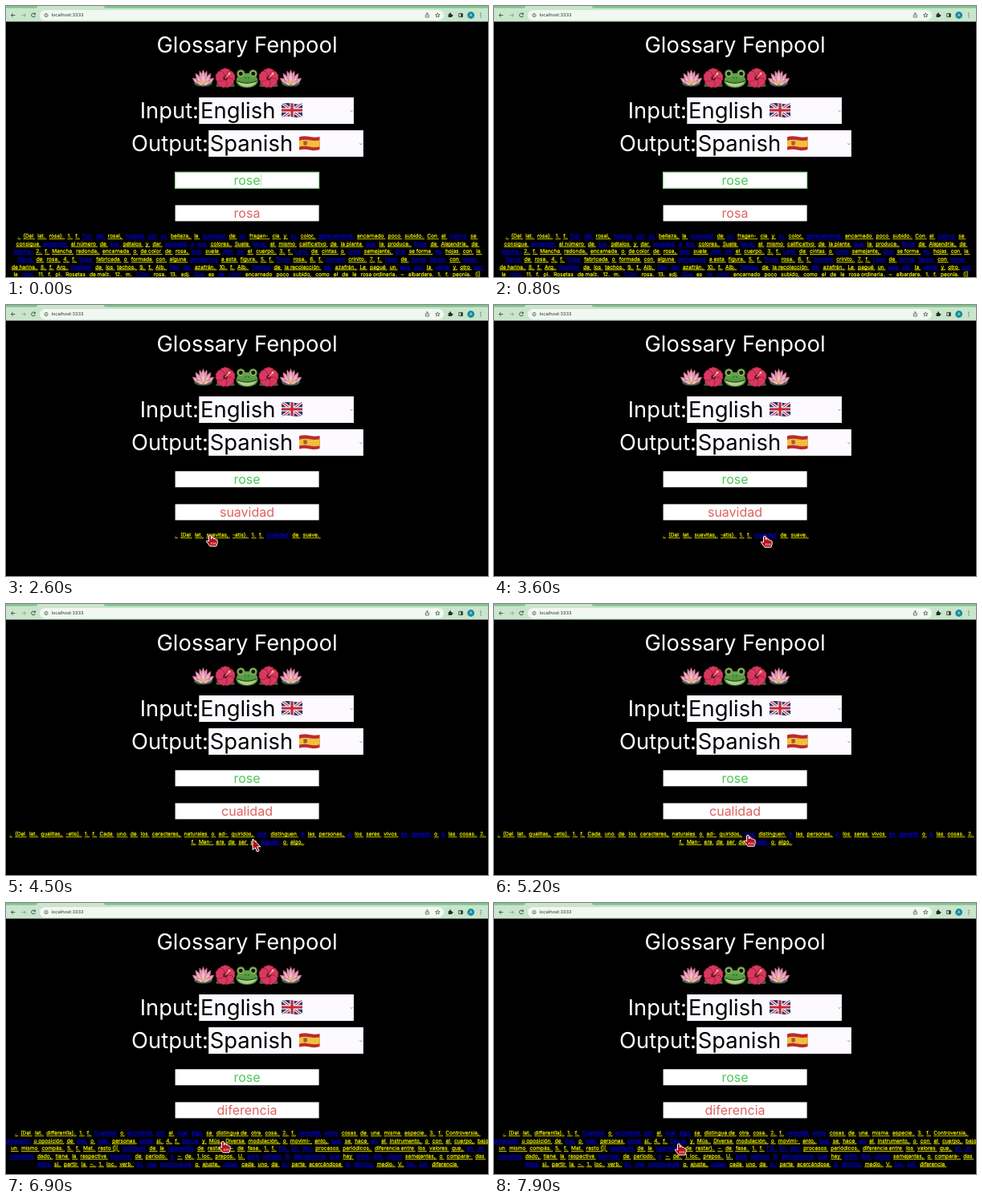
An HTML page for the animation above (8000 ms loop, 600 px wide and 338 px high).

```html
<!DOCTYPE html>
<html lang="en">
<head>
<meta charset="utf-8">
<title>Glossary Fenpool</title>
<style>
html, body { margin: 0; width: 100%; height: 100%; overflow: hidden; background: #000; }
svg { display: block; width: 100vw; height: 100vh; font-family: Inter, sans-serif; text-rendering: geometricPrecision; }
.big { font-size: 27.4px; }
.field { font-size: 16px; text-anchor: middle; }
.def { font-size: 6.6px; text-anchor: middle; }
.def tspan { fill: #ff0; stroke: #ff0; stroke-width: .18px; text-decoration: underline; }
.def .known { fill: #00d; stroke: #00d; }
.icon { fill: none; stroke: #3b463e; stroke-width: .9; }
</style>
</head>
<body>
<svg viewBox="0 0 600 338">
  <defs>
    <linearGradient id="petal" x1="0" y1="0" x2="0" y2="1">
      <stop offset="0" stop-color="#e283a4"/><stop offset="1" stop-color="#fae3e4"/>
    </linearGradient>
    <linearGradient id="skin" x1="0" y1="0" x2="0" y2="1">
      <stop offset="0" stop-color="#62a94b"/><stop offset="1" stop-color="#47873a"/>
    </linearGradient>
    <g id="lotus">
      <path d="M-12 6Q-7 3 0 5Q7 3 12 6Q9 11 0 10.5Q-9 11-12 6Z" fill="#39683c"/>
      <g fill="url(#petal)" stroke="#bd6482" stroke-width=".6">
        <path d="M0 8Q-11 8-13.3 0Q-6-.5 0 8Z"/><path d="M0 8Q11 8 13.3 0Q6-.5 0 8Z"/>
        <path d="M0 8Q-10 3-9.5-6Q-3-3 0 8Z"/><path d="M0 8Q10 3 9.5-6Q3-3 0 8Z"/>
        <path d="M0 8Q-6 0-4.5-9Q0-5 0 8Z"/><path d="M0 8Q6 0 4.5-9Q0-5 0 8Z"/>
        <path d="M0 8Q-5 0 0-10.5Q5 0 0 8Z"/>
        <path d="M0 9Q-7 9-8.5 3Q-3 3 0 9Z"/><path d="M0 9Q7 9 8.5 3Q3 3 0 9Z"/>
      </g>
      <path d="M-3 4.5Q0 1 3 4.5L0 8Z" fill="#e6bd5c"/>
    </g>
    <g id="hibiscus">
      <path d="M-12 10Q-10 4-3 4L0 6L3 4Q10 4 12 10Q6 12.5 0 8Q-6 12.5-12 10Z" fill="#3c6f38"/>
      <g id="petals"></g>
      <circle r="2.8" fill="#7d0e2c"/>
      <path d="M0 0L4.5-5" stroke="#f0b9a0" stroke-width="1.1"/>
      <circle cx="5" cy="-5.6" r="1.3" fill="#f3cd62"/>
    </g>
    <g id="frog">
      <g fill="#569c43"><circle cx="-7.6" cy="-6" r="5.2"/><circle cx="7.6" cy="-6" r="5.2"/></g>
      <path d="M-13.6 4Q-13-6 0-6.5Q13-6 13.6 4Q11 11.5 0 11.5Q-11 11.5-13.6 4Z" fill="url(#skin)"/>
      <path d="M-12.4 3.6Q0 9 12.4 3.6Q9 10.5 0 10.5Q-9 10.5-12.4 3.6Z" fill="#b4cf88"/>
      <g fill="#d9cf86"><circle cx="-7.8" cy="-6.2" r="3.4"/><circle cx="7.8" cy="-6.2" r="3.4"/></g>
      <g fill="#11180d"><circle cx="-7.8" cy="-6.2" r="2.6"/><circle cx="7.8" cy="-6.2" r="2.6"/>
        <circle cx="-1.8" cy="-.8" r=".6"/><circle cx="1.8" cy="-.8" r=".6"/></g>
      <path d="M-12.4 3Q0 8.4 12.4 3" fill="none" stroke="#24491c" stroke-width="1.1"/>
    </g>
    <clipPath id="flagBox"><path d="M0 1.5Q6-.8 13 .8T26 .8V17Q20 19 13 17.4T0 17.6Z"/></clipPath>
  </defs>

  <rect width="600" height="338"/>

  <g id="browser">
    <rect width="600" height="19.5" fill="#c9e5cc"/>
    <rect width="600" height="2.6" fill="#7cc58d"/>
    <path d="M36 3Q39 3 39 0H122Q122 3 125 3Z" fill="#c9e5cc"/>
    <rect x="42" y="5" width="503" height="13" rx="6.5" fill="#f0f8f1"/>
    <g class="icon">
      <path d="M11.3 11.5H6.5M8.7 9.2L6.3 11.5L8.7 13.8"/>
      <path d="M19.6 11.5H24.4M22.3 9.2L24.7 11.5L22.3 13.8" stroke="#8fa594"/>
      <path d="M36 9.9A2.4 2.4 0 1 0 36.4 12M36.4 8.6V10.4H34.5"/>
      <circle cx="50" cy="11.5" r="2.1" stroke-width=".7"/><path d="M50 11.2V12.7M50 10V10.5" stroke-width=".7"/>
      <path d="M523.3 10.8H522.3V14H526.3V10.8H525.3M524.3 12.2V8.4M523.1 9.5L524.3 8.3L525.5 9.5" stroke-width=".7"/>
      <path d="M537.3 8.7L538.1 10.6L540.1 10.7L538.5 11.9L539 13.9L537.3 12.8L535.6 13.9L536.1 11.9L534.5 10.7L536.5 10.6Z" stroke-width=".7"/>
      <path d="M563.7 9.4H568.3V13.6H563.7Z"/>
    </g>
    <g fill="#26302a">
      <path d="M550.6 9.9H552.2A1 1 0 1 1 553.8 9.9H555V11A1 1 0 1 1 555 12.7V14H550.6Z"/>
      <path d="M566.2 9.4H568.3V13.6H566.2Z"/>
      <circle cx="591" cy="9.2" r=".6"/><circle cx="591" cy="11.5" r=".6"/><circle cx="591" cy="13.8" r=".6"/>
    </g>
    <circle cx="578.7" cy="11.5" r="4.4" fill="#168aa0"/>
    <text x="578.7" y="13.3" font-size="5" text-anchor="middle" fill="#fff">A</text>
    <text x="56.5" y="13.4" font-size="5.7" fill="#26302a">localhost:3333</text>
  </g>

  <text class="big" x="300" y="58" text-anchor="middle" fill="#fff">Glossary Fenpool</text>
  <use href="#lotus" x="245.5" y="90"/><use href="#hibiscus" x="273" y="90"/>
  <use href="#frog" x="300" y="90.5"/>
  <use href="#hibiscus" x="327" y="90"/><use href="#lotus" x="354.5" y="90"/>

  <g fill="#fdfaff"><rect x="240.3" y="114" width="192.6" height="33"/><rect x="252.2" y="155" width="192.6" height="33"/></g>
  <g class="big">
    <text x="240" y="140" text-anchor="end" fill="#fff">Input:</text>
    <text x="252" y="181.2" text-anchor="end" fill="#fff">Output:</text>
    <text x="242" y="140">English</text>
    <text x="253.7" y="181.2">Spanish</text>
  </g>
  <g fill="none" stroke="#555" stroke-width=".7">
    <path d="M428.8 130.2L430.2 131.6L431.6 130.2"/><path d="M440.3 171.4L441.7 172.8L443.1 171.4"/>
  </g>
  <g transform="translate(343 120.8)"><g clip-path="url(#flagBox)">
    <rect width="26" height="19" fill="#263672"/>
    <path d="M0 0L26 19M26 0L0 19" stroke="#f4f2f4" stroke-width="3.6"/>
    <path d="M0 0L26 19M26 0L0 19" stroke="#c32a3c" stroke-width="1.2"/>
    <path d="M13 0V19M0 9.2H26" stroke="#f4f2f4" stroke-width="5.4"/>
    <path d="M13 0V19M0 9.2H26" stroke="#c32a3c" stroke-width="3.2"/>
  </g></g>
  <g transform="translate(364.8 162.1)"><g clip-path="url(#flagBox)">
    <rect width="26" height="19" fill="#bb2c2e"/>
    <path d="M0 5.8Q6 3.6 13 5.2T26 5.2V13.2Q20 15 13 13.4T0 13.6Z" fill="#f0c03a"/>
    <path d="M5.5 6.5H10V10.5Q7.7 13 5.5 10.5Z" fill="#a9573c"/>
  </g></g>

  <rect id="box" x="210.6" y="207.3" width="179" height="20" fill="#fff"/>
  <rect x="210.6" y="248.4" width="179" height="20" fill="#fff"/>
  <text class="field" x="300" y="222.8" fill="#4cc653">rose</text>
  <path id="caret" d="M317.3 209.5V225" stroke="#9fb0a2" stroke-width=".6"/>
  <text class="field" id="answer" x="300" y="263.9" fill="#de625f"></text>
  <g id="defs"></g>

  <g id="cursor" stroke="#fff" stroke-linejoin="round">
    <path id="arrow" d="M0 0V13.6L3.2 10.9L5.6 16L8.2 14.8L5.8 9.8H10Z" fill="#b3141c" stroke-width="1"/>
    <g id="hand">
      <path d="M-1.5 1Q0-1 1.5 1V5Q3-.2 4.4 5Q5.8 4 7.2 5.8Q9.2 5.4 9.2 7.5V10L7.8 14.2H0L-4.6 8.2Q-4.3 6-1.5 8Z" fill="#b8121c" stroke-width="1"/>
      <path d="M1.6 9.3V12M4 9.3V12M6.3 9.3V12" stroke-width=".8"/>
    </g>
  </g>
</svg>
<script>
const LOOP = 8000;
const $ = id => document.getElementById(id);

// "*" marks a blue word, "_" a plain space inside one link
const pages = [
  { at: 0, word: "rosa", lines: [
    ". (Del lat. rosa). 1. f. *Flor *del rosal, *notable *por *su belleza, la *suavidad de *su fragan- cia y *su color, *generalmente encarnado poco subido. Con el *cultivo se",
    "consigue *aumentar el_número de *sus pétalos y dar *variedad *a *sus colores. Suele *llevar el mismo calificativo de la_planta *que la produce. *Rosa de Alejandría, de",
    "*alguna. 2. f. Mancha redonda, encarnada o de_color de rosa, *que suele *salir *en el cuerpo. 3. f. *Lazo de cintas o *cosa semejante, *que se_forma *en hojas con la",
    "*figura de rosa. 4. f. *Cosa fabricada o formada con alguna *semejanza a_esta figura. 5. f. *Fruta rosa. 6. f. *cometa crinito. 7. f. *Lazo de *forma *hecho con *masa",
    "de_harina. 8. f. Arq. *Rosetón de los techos. 9. f. Alb. *Flor *del azafrán. 10. f. Alb. *Tiempo de la_recolección *del azafrán. Le pagué un *anís *por la *venta y otro *por",
    "la *rosa. 11. f. pl. Rosetas de_maíz. 12. m. *Color rosa. 13. adj. *Que es *de *color encarnado poco subido, como el de la rosa_ordinaria. ~ albardera. 1. f. peonía. (||"] },
  { at: 2300, word: "suavidad", lines: [
    ". (Del lat. suavitas, -atis). 1. f. *Cualidad de suave."] },
  { at: 3800, word: "cualidad", lines: [
    ". (Del lat. qualitas, -atis). 1. f. Cada uno de los caracteres, naturales o ad- quiridos, *que distinguen *a las personas, *a los seres vivos *en *general o *a las cosas. 2.",
    "f. Man- era de ser de *alguien o algo."] },
  { at: 5400, word: "que", lines: [
    ". (Del lat. quid). 1. pron. relat. Con esta sola *forma conviene *a los géneros mas- culino, femenino y neutro y *a los números *singular y plural. Con el *artículo *forma",
    "el relativo_compuesto: el_que, la_que, los_que, las_que, lo_que, *que *a *diferencia *de la_sola *forma que_posee *variación *de *género *y *número y puede construirse *en",
    "*concordancia con el ante- cedente. 2. pron. relat. *A veces equivale *a otros pronombres precedidos de preposición. El_día *en (en_el cual) llegaste *a Madrid. *la",
    "*Iglesia, el Rey, *que (a_quien) *Dios guarde. 3._pron. interrog. Agrupado o *no con un *nombre sustantivo, inquiere o pondera la naturaleza, cantidad, intensidad, etc., de",
    "algo. ORTOGR. Escr. con acento. ¿Qué castillos *son aquellos? ¿Qué buscan? *No sé *qué decir. 4. pron. excl. Agrupado con un *nombre sustantivo o seguido_de la",
    "*preposición de_y un *nombre sustantivo, encarece la naturaleza, cantidad, calidad, inten- sidad, etc., de algo. ORTOGR. Escr. con acento. ¡Qué *tiempo de placeres y de"] },
  { at: 6900, word: "diferencia", lines: [
    ". (Del lat. differentĭa). 1. f. *Cualidad o *accidente *por el *cual *algo se distingue_de otra cosa. 2. f. *variedad *entre cosas de una misma especie. 3. f. Controversia,",
    "*disensión u_oposición de *dos o *más personas *entre sí. 4. f. *Danza y Mús. Diversa modulación, o movimi- ento, *que se hace *en el instrumento, o con el cuerpo, bajo",
    "un mismo compás. 5. f. Mat. resto_(|| *resultado de la *operación de restar). ~ de fase. 1. f. *Fís. *En *dos procesos periódicos, diferencia_entre los valores que, *en *un",
    "*momento dado, tiene la respectiva *fracción de período. *a ~ de. 1._loc. prepos. U. *para *señalar *la *discrepancia *que hay *entre *dos *cosas semejantes, o compara- das",
    "*entre sí. partir la ~. 1. loc. verb. *En *una *controversia o ajuste, *ceder cada uno de *su parte acercándose *al *término medio. V. *sin, *por diferencia"] }
];

// time, x, y of the pointer tip, and whether it is a hand from then on
const moves = [
  [1000, 372, 226, 0], [1500, 357, 239, 0], [1650, 357, 239, 0], [2050, 254, 286, 1],
  [2900, 254, 287, 1], [3400, 337, 288, 1], [3950, 337, 288, 0], [4350, 307, 293, 0],
  [4600, 307, 293, 0], [5000, 316, 288, 1], [5450, 316, 288, 1], [5900, 351, 306.5, 1],
  [6050, 351, 306.5, 1], [6450, 292, 296, 1], [6650, 292, 296, 1], [6900, 270, 297, 1],
  [7200, 270, 297, 1], [7800, 230, 300, 1], [8000, 230, 300, 1]
];

const wordSpan = (word, i) => {
  const known = word[0] === "*";
  const text = word.replace("*", "").replace(/_/g, "\u00a0");
  return `<tspan${i ? ' dx="3.2"' : ""}${known ? ' class="known"' : ""}>${text}\u00a0</tspan>`;
};
const lineText = (line, i) =>
  `<text class="def" x="301" y="${(289.2 + i * 9.6).toFixed(1)}">${line.split(" ").map(wordSpan).join("")}</text>`;

$("defs").innerHTML = pages.map(p => `<g>${p.lines.map(lineText).join("")}</g>`).join("");
$("petals").innerHTML = [0, 72, 144, 216, 288].map(a =>
  `<path transform="rotate(${a})" d="M0 0Q-8-4-6.5-9Q-5-12-2.5-11.5Q0-13.5 2.5-11.5Q5-12 6.5-9Q8-4 0 0Z" fill="#d6395f" stroke="#97163b" stroke-width=".7"/>`).join("");

const show = (el, on) => el.setAttribute("visibility", on ? "visible" : "hidden");
const ease = u => u * u * (3 - 2 * u);

function drawCursor(t) {
  const visible = t >= moves[0][0];
  $("cursor").style.display = visible ? "" : "none";
  if (!visible) return;
  const i = Math.min(moves.findLastIndex(m => m[0] <= t), moves.length - 2);
  const [t0, x0, y0, hand] = moves[i], [t1, x1, y1] = moves[i + 1];
  const u = ease((t - t0) / (t1 - t0));
  $("cursor").setAttribute("transform", `translate(${x0 + (x1 - x0) * u} ${y0 + (y1 - y0) * u})`);
  show($("hand"), hand);
  show($("arrow"), !hand);
}

function draw(t) {
  const page = pages.findLastIndex(p => p.at <= t);
  const focused = t < 2100;
  $("answer").textContent = pages[page].word;
  [...$("defs").children].forEach((g, i) => { g.style.display = i === page ? "" : "none"; });
  $("box").setAttribute("stroke", focused ? "#94d89c" : "none");
  $("box").setAttribute("stroke-width", 1.2);
  show($("caret"), focused && t % 1000 < 500);
  drawCursor(t);
}

const start = performance.now();
function tick() {
  draw((performance.now() - start) % LOOP);
  requestAnimationFrame(tick);
}
tick();
</script>
</body>
</html>
```
